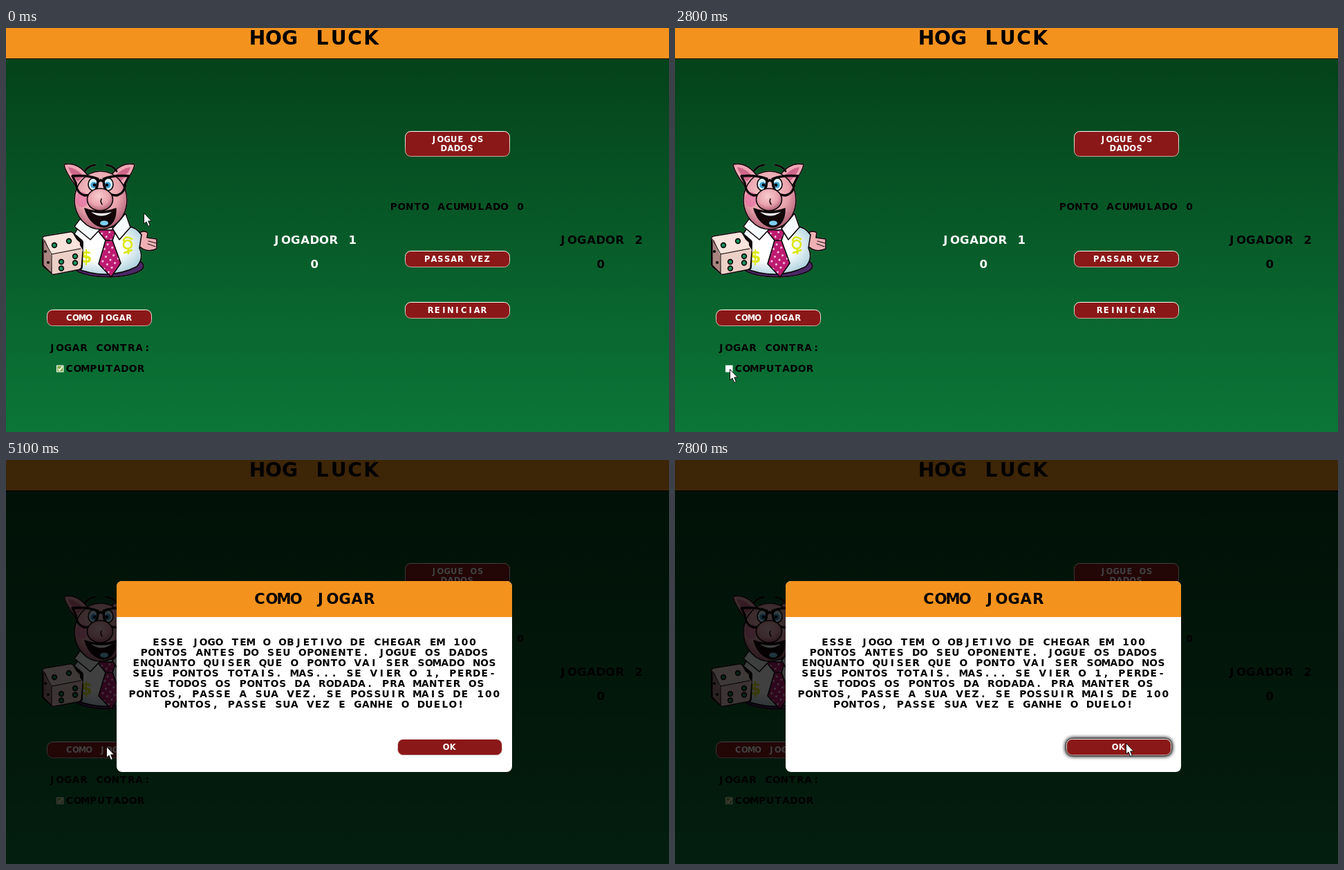
An HTML page that plays this animation: 959x584 px, repeating every 8 s.

```html
<!DOCTYPE html>
<html lang="pt">
<head>
<meta charset="utf-8">
<title>Hog Luck</title>
<style>
html, body { margin: 0; width: 100%; height: 100%; overflow: hidden; background: #05431a; }
svg { display: block; }
text { font-family: "DejaVu Sans", sans-serif; font-weight: bold; text-anchor: middle; }
.btn rect { fill: #8b1818; stroke: url(#edge); }
.btn.hover rect { filter: drop-shadow(0 0 3px #000) drop-shadow(0 0 1px #000); }
#pig { stroke: #0b0507; stroke-width: 1.6; stroke-linejoin: round; stroke-linecap: round; filter: drop-shadow(0 0 .7px #dddc); }
#pig .bare { stroke: none; }
#pig .line { fill: none; }
</style>
</head>
<body>
<svg width="959" height="584" viewBox="0 0 959 584">
  <defs>
    <linearGradient id="felt" x2="0" y2="1"><stop stop-color="#04421a"/><stop offset="1" stop-color="#0b7638"/></linearGradient>
    <linearGradient id="edge" x2="0" y2="1"><stop stop-color="#fff"/><stop offset="1" stop-color="#c9a9a4"/></linearGradient>
    <radialGradient id="skin" cx=".45" cy=".35" r=".68"><stop stop-color="#f8cccf"/><stop offset=".6" stop-color="#e9a3ad"/><stop offset="1" stop-color="#a9586f"/></radialGradient>
    <radialGradient id="shirt" cx=".45" cy=".4" r=".65"><stop offset=".5" stop-color="#fff"/><stop offset="1" stop-color="#a9cfdc"/></radialGradient>
    <pattern id="dotted" width="8" height="8" patternUnits="userSpaceOnUse" patternTransform="rotate(35)">
      <rect width="8" height="8" fill="#bd1a70"/><circle cx="4" cy="4" r="1.4" fill="#ffe6f2"/>
    </pattern>
  </defs>
  <rect y="44" width="959" height="540" fill="url(#felt)"/>
  <rect width="959" height="44" fill="#f4921e"/>
  <rect y="44" width="959" height="1"/>

  <g id="pig">
    <!-- body and hand -->
    <path d="M190 298Q199 291 205 296L204 303 218 305V319Q203 327 190 313Z" fill="#efb0b4"/>
    <path d="M206 308L217 311M205 312L216 316" class="line" stroke-width="1"/>
    <ellipse cx="148" cy="344" rx="51" ry="16" fill="#4b2867"/>
    <path d="M105 288Q76 330 100 347Q147 366 189 345Q200 333 193 318L196 299Q186 284 170 288Z" fill="url(#shirt)"/>
    <path d="M132 292H159L154 307 166 340 152 360 134 341 144 307Z" fill="url(#dotted)"/>
    <path d="M144 307H154" class="line"/>
    <path d="M107 276L99 287 122 306 136 291ZM173 268L180 288 164 306 154 290Z" fill="#f5fbfd"/>
    <text x="116" y="339" font-size="24" fill="#dce80f" class="bare">$</text>
    <g fill="none" stroke="#dce80f" stroke-width="2.6">
      <circle cx="176" cy="313" r="6"/><path d="M170 307Q173 299 182 305M177 319V326M171 325L182 321"/>
    </g>
    <!-- head: one half mirrored -->
    <g id="ear">
      <path d="M104 232Q85 208 84 197Q104 193 119 214Z" fill="#f0a7b3"/>
      <path d="M104 222Q91 208 90 201Q103 203 112 214Z" fill="#cf688a" class="bare"/>
    </g>
    <use href="#ear" transform="translate(270) scale(-1 1)"/>
    <ellipse cx="137" cy="249" rx="38" ry="42" fill="url(#skin)"/>
    <ellipse cx="110" cy="248" rx="9" ry="11" fill="#e563a0" opacity=".55" class="bare"/>
    <g id="eye">
      <path d="M114 207Q119 199 129 198" class="line" stroke-width="2.8"/>
      <ellipse cx="126" cy="226" rx="7" ry="9" fill="#d9f3fc"/>
      <circle cx="127" cy="227" r="4.6" fill="#3a9fd4" class="bare"/>
      <circle cx="128" cy="227" r="2.3" class="bare"/>
      <path d="M96 214Q116 212 133 218Q133 242 114 242Q102 239 101 224ZM133 222L137 220" class="line" stroke-width="3.4"/>
    </g>
    <use href="#eye" transform="translate(274) scale(-1 1)"/>
    <path d="M114 261Q136 269 159 261Q159 285 142 288Q122 286 114 261Z" fill="#120407"/>
    <path d="M123 266Q138 270 153 266Q138 277 123 266Z" fill="#fff" class="bare"/>
    <ellipse cx="142" cy="282" rx="6" ry="3.6" fill="#7bcff0" class="bare"/>
    <ellipse cx="136" cy="248" rx="18.5" ry="16" fill="url(#skin)"/>
    <path d="M138 247Q136 251 139 255" class="line"/>
    <!-- die -->
    <path id="hull" d="M57 305L94 299 107 310 106 345 69 352 57 342Z" stroke-width="10"/>
    <use href="#hull" fill="#ecd0c8" class="bare"/>
    <path d="M57 305L94 299 107 321 68 328Z" fill="#f8e4dd" stroke="#f8e4dd" stroke-width="7"/>
    <path d="M68 329L107 321 105 345 69 352Z" fill="#ecd0c8" stroke="#ecd0c8" stroke-width="7"/>
    <path d="M56 308L64 330 65 351 56 342Z" fill="#a98480" stroke="#a98480" stroke-width="3"/>
    <path d="M54 305L66 327 108 319M66 327V356" class="line" stroke-width="1"/>
    <g id="pips"></g>
  </g>

  <g id="page"></g>
  <rect x="73" y="487.5" width="10.5" height="10" fill="#fff"/>
  <g id="tick">
    <rect x="74" y="488.5" width="8.5" height="8" fill="#86ad4c"/>
    <path d="M75.5 492.5l2 2.5 4-5.5" fill="none" stroke="#fff" stroke-width="1.6"/>
  </g>
  <g id="modal">
    <rect width="959" height="584" opacity=".75"/>
    <rect x="160" y="175" width="572" height="276" rx="8" fill="#fff"/>
    <path d="M160 227V183a8 8 0 0 1 8-8H724a8 8 0 0 1 8 8V227Z" fill="#f4921e"/>
  </g>
  <path id="cursor" d="M.5 .5V16L4 13 6.7 19.5 9.3 18.4 6.7 12H11.5Z" fill="#fff" stroke="#111"/>
</svg>
<script>
const $ = id => document.getElementById(id);
const add = (id, markup) => $(id).insertAdjacentHTML('beforeend', markup);

// Centred text with one character per grid cell
function label(cx, y, pitch, text, color = '#000') {
  const x = [...text].map((_, i) => cx + (i - text.length / 2 + .45) * pitch);
  return `<text x="${x.join(' ')}" y="${y}" font-size="${pitch * 1.2}" fill="${color}">${text}</text>`;
}

const button = (id, cx, cy, ...lines) => {
  const h = 11 + 13 * lines.length;
  return `<g class="btn" id="${id}"><rect x="${cx - 75.5}" y="${cy - h / 2 + .5}" width="151" height="${h - 1}" rx="8"/>` +
    lines.map((s, i) => label(cx, cy + 4 + 13 * (i - (lines.length - 1) / 2), 9.6, s, '#fff')).join('') + '</g>';
};

const player = (cx, name, color) => label(cx, 312, 13.75, name, color) + label(cx, 347, 13.75, '0', color);

add('page',
  label(447, 24, 23.5, 'HOG LUCK') +
  player(447, 'JOGADOR 1', '#fff') + player(861, 'JOGADOR 2') +
  label(653, 263, 11.45, 'PONTO ACUMULADO 0') +
  label(136, 467, 11.45, 'JOGAR CONTRA:') + label(144, 497, 11.45, 'COMPUTADOR') +
  button('roll', 653, 167.5, 'JOGUE OS', 'DADOS') +
  button('pass', 653, 334, 'PASSAR VEZ') +
  button('reset', 653, 408, 'REINICIAR') +
  button('help', 135, 419, 'COMO JOGAR'));

const rules = [
  'ESSE JOGO TEM O OBJETIVO DE CHEGAR EM 100',
  'PONTOS ANTES DO SEU OPONENTE. JOGUE OS DADOS',
  'ENQUANTO QUISER QUE O PONTO VAI SER SOMADO NOS',
  'SEUS PONTOS TOTAIS. MAS... SE VIER O 1, PERDE-',
  'SE TODOS OS PONTOS DA RODADA. PRA MANTER OS',
  'PONTOS, PASSE A SUA VEZ. SE POSSUIR MAIS DE 100',
  'PONTOS, PASSE SUA VEZ E GANHE O DUELO!'];
add('modal', label(447, 208, 17.6, 'COMO JOGAR') +
  rules.map((s, i) => label(446.5, 268 + 15 * i, 11.45, s)).join('') +
  button('ok', 642, 415, 'OK'));

// Pip pairs on the die: centre and half the gap between the two
const pair = (x, y, dx, dy, r) => [-1, 1].map(k =>
  `<circle cx="${x + k * dx}" cy="${y + k * dy}" r="${r}" fill="#16925a"/>`).join('');
add('pips', pair(80.5, 311, 10.5, -3, 3.4) + pair(90, 334, 10, -4, 3.4) +
  pair(90, 343.5, 10, -4, 3.4) + pair(59, 331, 2, 8, 1.3));

// Cursor moves: start, end, x, y; it rests in between
const moves = [
  [0, 0, 199, 267], [300, 700, 143, 404], [800, 1600, 81, 499], [1700, 2000, 80, 492],
  [2700, 2800, 79, 493], [3400, 4100, 153, 408], [4200, 4700, 145, 414],
  [5300, 5700, 370, 365], [5700, 5900, 463, 398], [6400, 7000, 632, 428],
  [7000, 7300, 694, 409], [7700, 7800, 652, 409]];

function tipAt(t) {
  let [, , x, y] = moves[0];
  for (const [from, to, toX, toY] of moves.slice(1)) {
    const k = Math.min(1, Math.max(0, (t - from) / (to - from)));
    x += (toX - x) * k;
    y += (toY - y) * k;
  }
  return [Math.round(x), Math.round(y)];
}

function draw(now) {
  const t = Math.floor(now % 8000 / 100) * 100;
  const [x, y] = tipAt(t);
  const open = t >= 5100;
  const over = (cx, cy) => Math.abs(x - cx) < 76 && Math.abs(y - cy) < 12;
  $('cursor').setAttribute('transform', `translate(${x} ${y})`);
  $('modal').style.display = open ? '' : 'none';
  $('tick').style.display = t >= 2400 && t < 3100 ? 'none' : '';
  $('help').classList.toggle('hover', !open && over(135, 419));
  $('ok').classList.toggle('hover', open && over(642, 415));
}

const start = performance.now();
function loop() {
  draw(performance.now() - start);
  requestAnimationFrame(loop);
}
loop();
</script>
</body>
</html>
```
